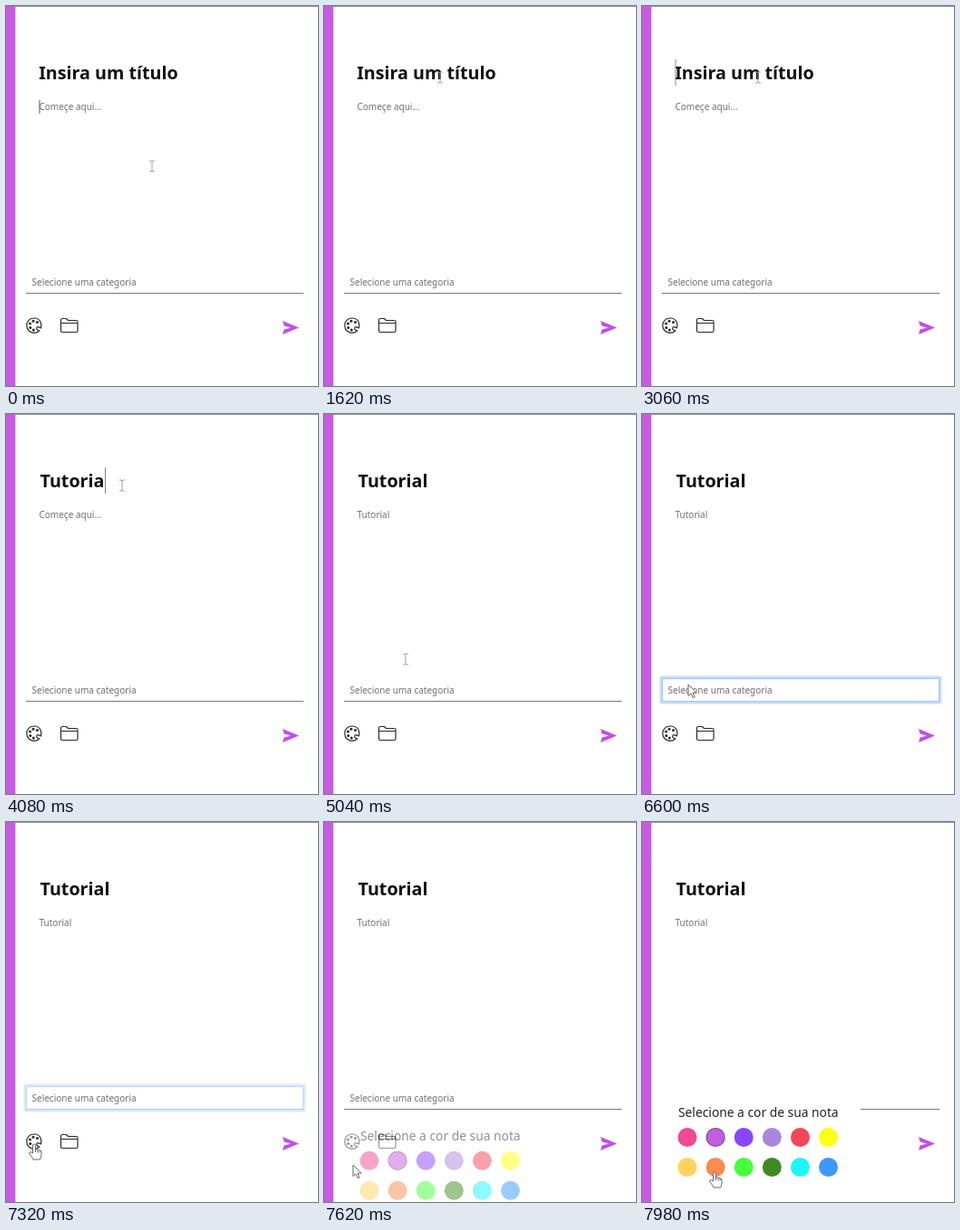
These frames come from a looping animation (344 by 420 pixels, 8000 ms). An HTML page:

```html
<!DOCTYPE html>
<html lang="pt">
<head>
<meta charset="utf-8">
<title>Nova nota</title>
<style>
  html, body { margin: 0; width: 100%; height: 100%; overflow: hidden; background: #fff; }
  svg { display: block; width: 100vw; height: 100vh; }
  text { font-family: "Noto Sans", "Open Sans", sans-serif; white-space: pre; }
  .title { font-size: 19.7px; font-weight: 600; fill: #111; }
  .small { font-size: 10px; fill: #707070; }
  .head { font-size: 13.8px; fill: #222; }
  .icon { fill: none; stroke: #2b2b2b; stroke-width: 1.2; stroke-linejoin: round; }
</style>
</head>
<body>
<svg viewBox="0 0 344 420">
  <rect width="344" height="420" fill="#fff"/>
  <rect x="10" width="334" height="1" fill="#999"/>
  <rect width="10.4" height="420" fill="#c75be2"/>

  <text id="title" class="title" y="81"></text>
  <text id="body" class="small" x="36.5" y="115"></text>
  <rect id="caret" width="1"/>

  <rect id="line" x="22" y="317" width="306" height="1" fill="#777"/>
  <g id="focus" fill="none">
    <rect x="21" y="291" width="308" height="28" rx="1" stroke="#c6defa" stroke-width="3"/>
    <rect x="22.5" y="292.5" width="305" height="25" stroke="#9cc4f0"/>
  </g>
  <text class="small" x="28.5" y="309">Selecione uma categoria</text>

  <g class="icon">
    <path d="M38.500 356C40 351 37.500 345 31 345C26 345 22.800 348.500 22.800 353C22.800 358 26.500 361.300 31 361.300C33.500 361.300 35.500 360.500 37 359C34 358.500 33 356.500 34 355C35.200 353.500 36.500 355.500 38.500 356Z"/>
    <path d="M60.500 359V347Q60.500 345.500 62 345.500H66.500L68.500 347.500H77.500Q79 347.500 79 349V359Q79 360.500 77.500 360.500H62Q60.500 360.500 60.500 359ZM60.500 350.500H79"/>
  </g>
  <g id="dots" fill="#2b2b2b"></g>
  <path d="M305 348L323 355.500L305 363L306.500 357.500L314 355.500L306.500 353.500Z" fill="#c24fe6"/>

  <g id="panel">
    <rect x="11" y="296" width="230" height="180" fill="#fff"/>
    <text class="head" x="40" y="326">Selecione a cor de sua nota</text>
    <g id="swatches"></g>
  </g>

  <g id="pointer">
    <path id="ibeam" d="M-3 -6H-1L0 -5L1 -6H3M0 -5V5M-3 6H-1L0 5L1 6H3" fill="none" stroke="#a0a0a0"/>
    <path id="arrow" d="M0 0V12.500L3 9.800L5.200 14.800L7.200 13.900L5 9.200H9Z" fill="#fff" stroke="#666"/>
    <path id="hand" d="M-1.500 10V1.500Q-1.500 0 0 0T1.500 1.500V6Q3 5 4 6.500Q5.500 5.500 6.200 7Q8 6.500 8 8.500V12Q8 14 6.500 17H-1Q-2 14.500 -5 11Q-6 9 -4.500 8.800Q-3 8.600 -1.500 10ZM1.500 6V9M4 6.500V9.500M6.200 7V9.500" fill="#fff" stroke="#666"/>
  </g>
</svg>
<script>
const LOOP = 8000, BLINK = 530, WORD = "Tutorial";
const KEY_GAP = 45, TITLE_CLICK = 1750, TITLE_TYPE = 3780, BODY_TYPE = 4180;
const SELECT_CLICK = 5400, PALETTE_CLICK = 7270, PANEL_IN = 7420, PANEL_MS = 400;

const $ = id => document.getElementById(id);
const clamp = v => Math.max(0, Math.min(1, v));
const smooth = v => v * v * (3 - 2 * v);

// time, x, y of the pointer's hot spot
const route = [
  [0, 161, 177], [250, 161, 177], [1000, 128, 79], [4700, 128, 79],
  [5040, 90, 271], [5300, 54, 300], [5450, 51, 299], [6620, 51, 299],
  [7050, 31, 354], [7320, 31, 356], [7560, 32, 379], [7640, 32, 379],
  [7940, 80, 387], [8000, 80, 387]
];

// time at which each pointer shape takes over
const shapes = [[0, "ibeam"], [5220, "arrow"], [6960, "hand"], [7430, "arrow"], [7800, "hand"]];

function add(parent, name, attrs) {
  const el = document.createElementNS("http://www.w3.org/2000/svg", name);
  for (const key in attrs) el.setAttribute(key, attrs[key]);
  parent.append(el);
}

[[26.5, 351], [30, 348.3], [34.5, 349.5], [26.8, 355.5], [30.3, 358]]
  .forEach(([cx, cy]) => add($("dots"), "circle", { cx, cy, r: 1.5 }));

["#f04a94", "#c45ce2", "#8a45ff", "#ab86e0", "#f4465a", "#ffff14",
 "#ffd35c", "#f98c4e", "#45ff3c", "#3f8a22", "#1cf6ff", "#3c98ff"]
  .forEach((fill, i) => add($("swatches"), "circle", {
    cx: 50 + 31.1 * (i % 6), cy: i < 6 ? 348.5 : 381.5, r: i === 1 ? 10 : 10.5,
    fill, stroke: i === 1 ? "#79528c" : "none", "stroke-width": 1.2
  }));

function pointerAt(t) {
  const i = route.findIndex(p => p[0] > t);
  const [t0, x0, y0] = route[i - 1], [t1, x1, y1] = route[i];
  const k = smooth((t - t0) / (t1 - t0));
  return [x0 + (x1 - x0) * k, y0 + (y1 - y0) * k];
}

const typed = (t, start) =>
  WORD.slice(0, Math.max(0, Math.min(WORD.length, Math.floor((t - start) / KEY_GAP) + 1)));

function setText(el, value) {
  if (el.textContent !== value) el.textContent = value;
}

function drawCaret(t, titleText, bodyText) {
  const inTitle = t >= TITLE_CLICK && t < BODY_TYPE - KEY_GAP;
  const el = inTitle ? $("title") : $("body");
  const text = inTitle ? titleText : bodyText;
  const lastKey = (WORD.length - 1) * KEY_GAP;
  let since = 0;
  if (t >= BODY_TYPE) since = BODY_TYPE + lastKey;
  else if (t >= TITLE_TYPE) since = TITLE_TYPE + lastKey;
  else if (t >= TITLE_CLICK) since = TITLE_CLICK;
  const on = t < SELECT_CLICK && (t < since || Math.floor((t - since) / BLINK) % 2 === 0);
  const caret = $("caret");
  caret.setAttribute("x", text ? Math.round(38 + el.getComputedTextLength()) : 36.5);
  caret.setAttribute("y", inTitle ? 59 : 104);
  caret.setAttribute("height", inTitle ? 29 : 15);
  caret.setAttribute("fill", inTitle ? "#888" : "#555");
  caret.setAttribute("opacity", on ? 1 : 0);
}

function draw(t) {
  const titleText = typed(t, TITLE_TYPE), bodyText = typed(t, BODY_TYPE);
  setText($("title"), titleText || "Insira um título");
  $("title").setAttribute("x", titleText ? 37.5 : 36.2);
  setText($("body"), bodyText || "Começe aqui...");
  drawCaret(t, titleText, bodyText);

  const focus = clamp((t - SELECT_CLICK) / 150) - clamp((t - PALETTE_CLICK) / 150);
  $("focus").setAttribute("opacity", focus);
  $("line").setAttribute("opacity", 1 - focus);

  const shown = clamp((t - PANEL_IN) / PANEL_MS);
  $("panel").setAttribute("opacity", shown);
  $("panel").setAttribute("transform", `translate(0 ${52 * (1 - shown)})`);

  const shape = shapes.filter(s => s[0] <= t).pop()[1];
  for (const id of ["ibeam", "arrow", "hand"])
    $(id).setAttribute("visibility", id === shape ? "visible" : "hidden");
  $("pointer").setAttribute("transform", `translate(${pointerAt(t)})`);
}

const start = performance.now();
function tick() {
  draw((performance.now() - start) % LOOP);
  requestAnimationFrame(tick);
}
tick();
</script>
</body>
</html>
```
